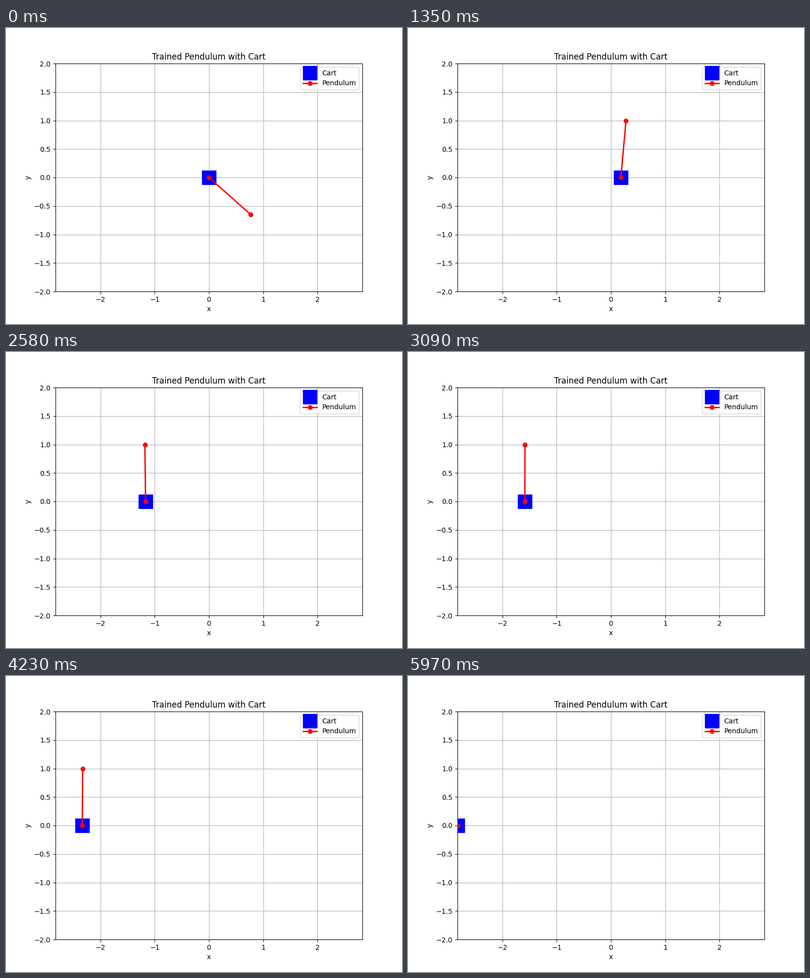
Recreate the animation shown at these times as a matplotlib script. Size 800 px wide and 600 px high, loop 6000 ms.

```python
import numpy as np
import matplotlib.pyplot as plt
from matplotlib.animation import FuncAnimation

FRAMES = 200
INTERVAL = 30
HALF_WIDTH = 2.83
UNIT = 310 / HALF_WIDTH  # pixels per x unit

START, LEFT_END = .869, -1.12  # angles of the first swing, from hanging down
TURN, CAUGHT = 15.5, 42        # steps: swing reverses, pole is upright

plt.rcParams["font.family"] = "DejaVu Sans"


def hermite(u, v0, v1, d0=0, d1=0):
    """Cubic from v0 to v1 with end slopes d0 and d1, for u in 0..1."""
    return (v0 + (v1 - v0) * u ** 2 * (3 - 2 * u)
            + d0 * u * (1 - u) ** 2 - d1 * u ** 2 * (1 - u))


def cart_path(t):
    """Push right, pull back left, then a slowing drift to the left edge."""
    kt = np.array([0, 10, 21, 26, 32, 45, 69, 103, 141, 172, 199])
    kx = np.array([0, 14, 76, 88, 80, 20, -74, -174, -256, -296, -310])
    slope = np.gradient(kx, kt)
    slope[0] = 0
    i = np.clip(np.searchsorted(kt, t, side="right") - 1, 0, len(kt) - 2)
    h = kt[i + 1] - kt[i]
    return hermite((t - kt[i]) / h, kx[i], kx[i + 1],
                   slope[i] * h, slope[i + 1] * h) / UNIT


def balanced(t):
    """Angle once caught: a dying lean on top of a slow drift."""
    lean = .191 * np.exp(-.115 * (t - 45)) + .012 - 1.6e-5 * (t - 127) ** 2
    return np.pi - lean


def swing(t):
    """Angle from hanging down: swing left, swing up, balance."""
    mid, amp = (START + LEFT_END) / 2, (START - LEFT_END) / 2
    down = mid + amp * np.cos(np.pi * t / TURN)
    span = CAUGHT - TURN
    end_rate = balanced(CAUGHT + .5) - balanced(CAUGHT - .5)
    up = hermite((t - TURN) / span, LEFT_END, balanced(CAUGHT),
                 d1=end_rate * span)
    return np.select([t < TURN, t < CAUGHT], [down, up], balanced(t))


steps = np.arange(FRAMES)
cart_x = cart_path(steps)
angle = swing(steps)
tip_x = cart_x + np.sin(angle)
tip_y = -np.cos(angle)

fig, ax = plt.subplots(figsize=(8, 6), dpi=100)
ax.set_xlim(-HALF_WIDTH, HALF_WIDTH)
ax.set_ylim(-2, 2)
ax.set_xlabel("x")
ax.set_ylabel("y")
ax.set_title("Trained Pendulum with Cart")
ax.grid(True)

cart, = ax.plot([], [], "bs", markersize=20, label="Cart")
pole, = ax.plot([], [], "ro-", lw=2, label="Pendulum")
ax.legend(loc="upper right")


def update(k):
    cart.set_data([cart_x[k]], [0])
    pole.set_data([cart_x[k], tip_x[k]], [0, tip_y[k]])
    return cart, pole


anim = FuncAnimation(fig, update, frames=FRAMES, interval=INTERVAL,
                     repeat=True, repeat_delay=0, blit=False)
plt.show()
```
